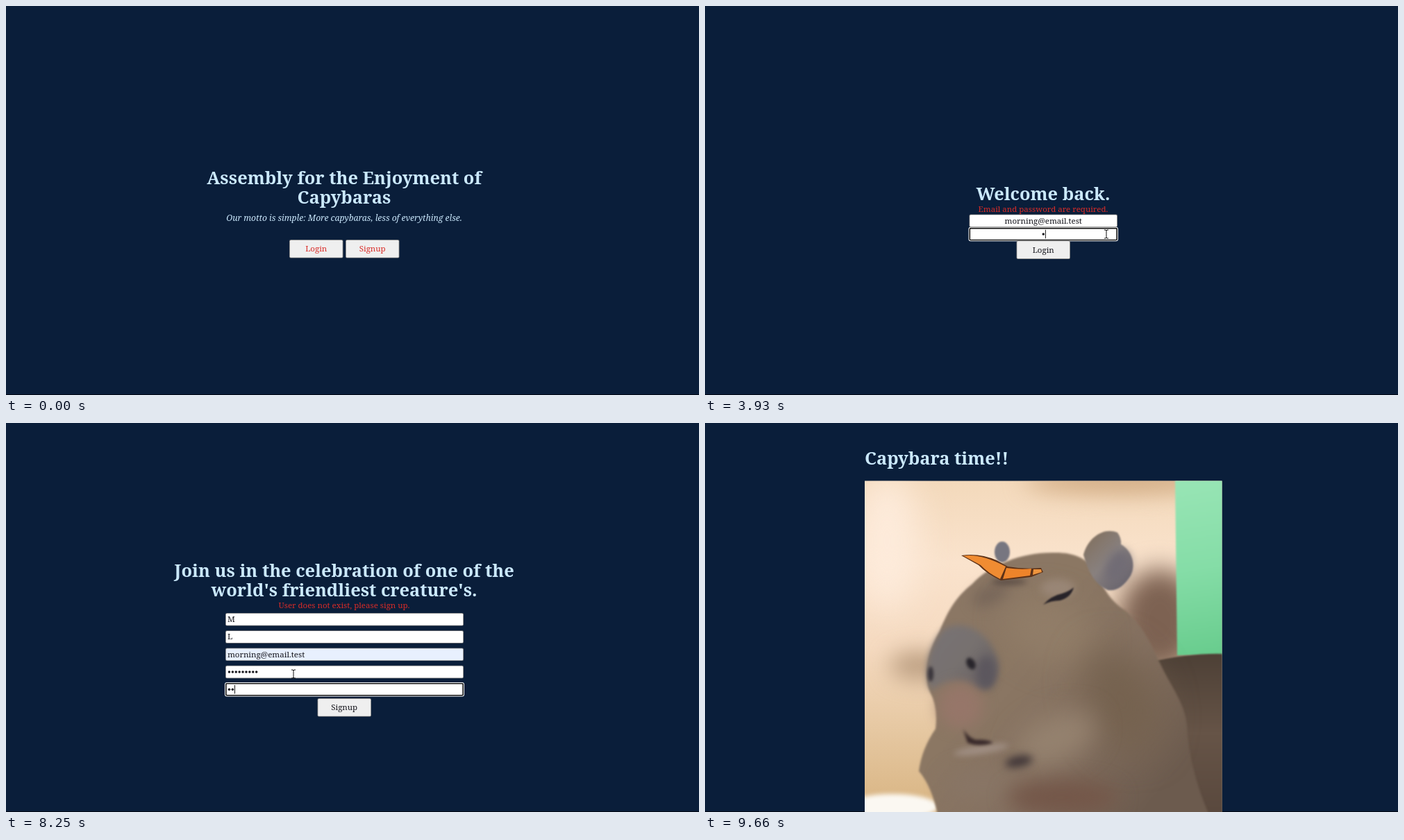
Animation, 998 px wide and 561 px high, one loop 9720 ms. Source, as an HTML page with a canvas:

```html
<!DOCTYPE html>
<html lang="en">
<head>
<meta charset="utf-8">
<title>Capybara club sign-up</title>
<style>
  html, body { margin: 0; width: 100%; height: 100%; overflow: hidden; background: #0a1e3a; }
  canvas { display: block; width: 100vw; height: 100vh; }
</style>
</head>
<body>
<canvas id="stage" width="998" height="561"></canvas>
<script>
const LOOP = 9720;
const CENTER = 487;
const EMAIL = 'morning@email.test';
const FAMILY = '"Noto Serif", serif';
const BODY = '11.5px ' + FAMILY;
const MOTTO = 'italic 12.1px ' + FAMILY;
const TITLE = 'bold 25.4px ' + FAMILY;
const NAVY = '#0a1e3a', PALE = '#cbe9fd', RED = '#d92c28', INK = '#15151c', HINT = '#757575';

const canvas = document.getElementById('stage');
const ctx = canvas.getContext('2d');

// Pointer path: time, x, y
const pointerPath = [
  [240, 530, 379], [720, 447, 349], [1050, 447, 349], [1350, 470, 308],
  [2310, 470, 308], [2560, 812, 326], [2620, 812, 326], [2880, 496, 349],
  [3090, 496, 349], [3600, 578, 329], [4200, 578, 329], [4560, 490, 349],
  [4760, 490, 349], [5190, 434, 288], [5600, 434, 288], [5850, 428, 310],
  [6180, 428, 310], [6360, 425, 334], [6450, 425, 334], [6660, 425, 384],
  [6750, 425, 384], [7020, 414, 362], [8430, 414, 362], [8790, 473, 413],
  [9270, 473, 413], [9620, 842, 545]
];

function pointerAt(t) {
  const next = pointerPath.findIndex(p => p[0] > t);
  if (next < 1) return null;
  const [t0, x0, y0] = pointerPath[next - 1];
  const [t1, x1, y1] = pointerPath[next];
  const k = (t - t0) / (t1 - t0);
  const ease = k * k * (3 - 2 * k);
  return { x: x0 + (x1 - x0) * ease, y: y0 + (y1 - y0) * ease };
}

function typed(text, t, start, step) {
  return text.slice(0, Math.max(0, Math.floor((t - start) / step) + 1));
}

function label(text, x, baseline, color, font = BODY, align = 'center') {
  ctx.font = font;
  ctx.fillStyle = color;
  ctx.textAlign = align;
  ctx.fillText(text, x, baseline);
}

function box(x, y, w, h, radius, color) {
  ctx.fillStyle = color;
  ctx.beginPath();
  ctx.roundRect(x, y, w, h, radius);
  ctx.fill();
}

function button(text, x, y, color = INK) {
  box(x, y, 77.5, 26.5, 2, '#767676');
  box(x + 0.8, y + 0.8, 75.9, 24.9, 1.5, '#efefef');
  label(text, x + 38.7, y + 17, color);
}

let fields = [];

function field({ x, y, w, text = '', hint = '', centered, secret, focused, fill = '#fff' }) {
  const h = 18.5;
  fields.push({ x, y, w, h });
  if (focused) {
    box(x - 1, y - 1, w + 2, h + 2, 3, '#fff');
    box(x, y, w, h, 2, '#101010');
    box(x + 1.6, y + 1.6, w - 3.2, h - 3.2, 0.5, fill);
  } else {
    box(x, y, w, h, 2, '#767676');
    box(x + 0.8, y + 0.8, w - 1.6, h - 1.6, 1.5, fill);
  }
  const baseline = y + 13;
  ctx.font = BODY;
  const width = secret ? text.length * 4.9 : ctx.measureText(text).width;
  const left = centered ? x + (w - width) / 2 : x + 3;
  if (!text) {
    label(hint, centered ? x + w / 2 : left, baseline, HINT, BODY, centered ? 'center' : 'left');
  } else if (secret) {
    for (let i = 0; i < text.length; i++) box(left + i * 4.9 + 0.7, y + 7.5, 3.5, 3.5, 1.75, INK);
  } else {
    label(text, left, baseline, INK, BODY, 'left');
  }
  if (focused) box(left + width + 0.2, y + 3, 0.9, 12.5, 0, '#000');
}

function home() {
  label('Assembly for the Enjoyment of', CENTER, 257, PALE, TITLE);
  label('Capybaras', CENTER, 285, PALE, TITLE);
  label('Our motto is simple: More capybaras, less of everything else.', CENTER, 310, PALE, MOTTO);
  button('Login', 408, 337, RED);
  button('Signup', 489, 337, RED);
}

function login(t) {
  const failed = t >= 2940;
  const shift = failed ? 7.5 : 0;
  label('Welcome back.', CENTER, failed ? 280 : 287, PALE, TITLE);
  if (failed) label('Email and password are required.', CENTER, 297, RED);
  const common = { x: 380.5, w: 213.5, centered: true };
  field({ ...common, y: 312.3 + shift, hint: 'Password', secret: true,
    text: typed('capybaras', t, 3900, 45), focused: t >= 3690 && t < 4620 });
  field({ ...common, y: 293 + shift, hint: 'Email', text: typed(EMAIL, t, 1500, 42),
    focused: t >= 1400 && t < 2910 });
  button('Login', 448.5, 331 + shift);
}

function signup(t) {
  label('Join us in the celebration of one of the', CENTER, 222, PALE, TITLE);
  label("world's friendliest creature's.", CENTER, 250, PALE, TITLE);
  label('User does not exist, please sign up.', CENTER, 267, RED);
  const filled = t >= 6690;
  const rows = [
    { hint: 'First name', from: 5220, text: t >= 5490 ? 'M' : '' },
    { hint: 'Last Name', from: 5880, text: t >= 6090 ? 'L' : '' },
    { hint: 'Email', from: 6390, text: filled ? EMAIL : '', fill: filled ? '#e8f0fe' : '#fff' },
    { hint: 'Password', from: 7050, text: typed('capybaras', t, 7170, 70), secret: true },
    { hint: 'Confirm password', from: 7920, text: typed('capybaras', t, 8200, 45), secret: true },
    { from: 8850 }
  ];
  rows.slice(0, 5).forEach((row, i) => field({
    ...row, x: 316, y: 274 + i * 25.25, w: 343,
    focused: t >= row.from && t < rows[i + 1].from
  }));
  button('Signup', 448.5, 397);
}

// Soft, simplified portrait, painted once
function paintPhoto() {
  const photo = document.createElement('canvas');
  photo.width = 998;
  photo.height = 561;
  const g = photo.getContext('2d');
  const gradient = (x0, y0, x1, y1, ...colors) => {
    const result = g.createLinearGradient(x0, y0, x1, y1);
    colors.forEach((c, i) => result.addColorStop(i / (colors.length - 1), c));
    return result;
  };
  const shape = (path, fill, blur = 0.6) => {
    g.filter = `blur(${blur}px)`;
    g.fillStyle = fill;
    g.fill(new Path2D(path));
  };
  const oval = (x, y, rx, ry, fill, blur = 1, turn = 0) => {
    g.filter = `blur(${blur}px)`;
    g.fillStyle = fill;
    g.beginPath();
    g.ellipse(x, y, rx, ry, turn, 0, 7);
    g.fill();
  };

  g.beginPath();
  g.rect(230, 83.5, 514.5, 478);
  g.clip();
  g.fillStyle = gradient(0, 83, 0, 561, '#f3d9bb', '#fae3cd', '#f5dac0', '#e6c8a2', '#d8b482');
  g.fillRect(230, 83, 515, 478);
  oval(262, 170, 45, 100, '#fdebdb', 25);
  oval(600, 84, 140, 18, '#d0aa82', 16);
  oval(655, 285, 60, 75, '#7d6252', 18);
  oval(308, 350, 42, 20, '#b99c7f', 16);
  oval(270, 553, 66, 18, '#fbf8f2', 3);
  shape('M677 80H748V335H680Z', gradient(690, 83, 735, 336, '#98e5b5', '#85dda7', '#68cc8d'), 1);

  // Back, then head and chest as one outline
  shape('M640 345Q700 331 750 333V570H640Z', gradient(0, 333, 0, 561, '#4d4036', '#665447', '#5a493e'), 1);
  oval(428, 186, 11, 15, '#777680');
  shape(`M385 232C410 205 455 187 500 187C530 186 548 194 562 212C574 240 585 258 605 270
    C636 298 645 326 656 348C672 382 690 402 694 435Q697 500 728 570H336Q328 526 308 502
    Q312 470 332 441Q336 410 324 388C315 365 318 335 338 300C350 270 362 250 385 232Z`,
    gradient(340, 220, 680, 500, '#8a7664', '#8b7763', '#847060', '#6c5b4e'), 1.5);
  oval(412, 248, 28, 14, '#78675a', 9, -0.4);
  oval(500, 300, 70, 45, '#917d68', 22, 0.4);
  oval(600, 400, 50, 80, '#75624f', 26, -0.4);
  oval(505, 455, 60, 32, '#95826f', 18, -0.4);
  oval(400, 520, 55, 25, '#887565', 14);
  oval(515, 540, 80, 25, '#745749', 14);
  oval(452, 488, 20, 8, '#403638', 6, -0.2);

  // Muzzle
  shape('M343 298C375 280 413 304 422 345C423 376 405 389 390 381Q360 362 325 386C314 360 320 325 343 298Z',
    gradient(320, 300, 420, 380, '#777275', '#77716f', '#625c60'), 5);
  oval(368, 408, 32, 32, '#967669', 10);
  oval(405, 360, 14, 24, '#5c575e', 6);
  oval(383, 347, 6, 9, '#28252b', 2, -0.5);
  oval(325, 362, 4, 11, '#39343a', 2);
  oval(398, 471, 40, 6, '#a08f84', 4, -0.15);
  shape('M372 442Q380 454 390 457Q406 456 415 461Q395 468 378 461Z', '#38292a', 2);

  // Eye and right ear
  oval(508, 238, 25, 13, '#998676', 6);
  shape('M487 262Q499 249 514 246Q524 243 531 237Q527 252 511 256Q498 256 487 262Z', '#272329', 1);
  shape('M545 190C552 164 575 150 594 158Q600 166 599 175C615 184 621 205 613 220Q598 244 580 241Q555 230 545 190Z',
    gradient(548, 165, 614, 230, '#81705f', '#89817f', '#65616b'), 1);
  oval(594, 207, 16, 25, '#716c75', 7, 0.4);

  // Butterfly
  oval(438, 229, 26, 4, 'rgba(55,45,48,.6)', 4);
  shape('M369 191Q395 187 420 198L436 207Q458 211 484 209L487 215L470 222L426 227Q405 217 394 205Z', '#5d3218');
  shape('M372 191.5Q398 188 433 207L425 225Q407 216 397 205Z', '#f08c32', 0.4);
  shape('M434 209Q455 212 470 210L468 220L429 225Z', '#ee842a', 0.4);
  shape('M473 211H484L485 215L472 219Z', '#ee943d', 0.4);
  return photo;
}
const photo = paintPhoto();

function album() {
  label('Capybara time!!', 230, 60, PALE, TITLE, 'left');
  ctx.drawImage(photo, 0, 0);
}

const arrow = new Path2D('M0 0V12.2L2.8 9.6L4.8 14.2L6.8 13.3L4.9 8.9H8.7Z');
const beam = new Path2D('M-3 -6H-1L0 -5L1 -6H3M0 -5V5M-3 6H-1L0 5L1 6H3');

function drawPointer(t) {
  const p = pointerAt(t);
  if (!p) return;
  const overText = fields.some(f => p.x > f.x && p.x < f.x + f.w && p.y > f.y && p.y < f.y + f.h);
  ctx.save();
  ctx.translate(p.x, p.y);
  ctx.lineWidth = overText ? 1 : 0.9;
  ctx.strokeStyle = '#111';
  ctx.fillStyle = '#fff';
  if (!overText) ctx.fill(arrow);
  ctx.stroke(overText ? beam : arrow);
  ctx.restore();
}

function draw(now) {
  const t = now % LOOP;
  fields = [];
  ctx.fillStyle = NAVY;
  ctx.fillRect(0, 0, 998, 561);
  ctx.fillStyle = '#030914';
  ctx.fillRect(0, 560, 998, 1);
  if (t < 900) home();
  else if (t < 4680) login(t);
  else if (t < 8940) signup(t);
  else album();
  drawPointer(t);
}

const started = performance.now();
function tick() {
  draw(performance.now() - started);
  requestAnimationFrame(tick);
}
tick();
</script>
</body>
</html>
```
